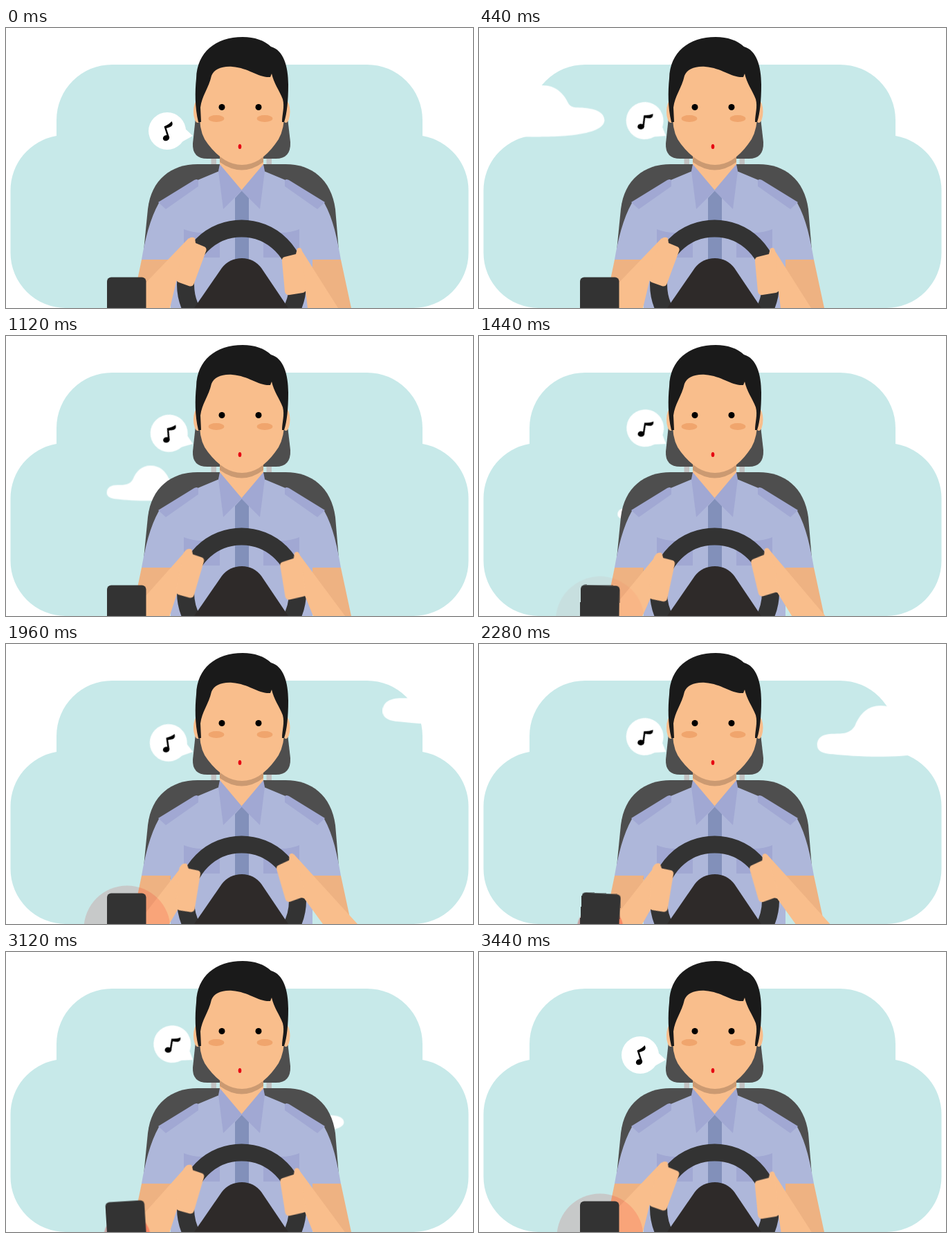
An HTML page without scripts that plays this animation: 675 px wide and 405 px high, repeating every 3.48 s.

```html
<!DOCTYPE html>
<html lang="en">
<head>
<meta charset="utf-8">
<title>Driver with a ringing phone</title>
<style>
  :root { --loop: 3480ms; }
  html, body { margin: 0; width: 100%; height: 100%; overflow: hidden; background: #fff; }
  svg { display: block; width: 100vw; height: 100vh; }

  .sky { fill: #c7e9e9; }
  .seat { fill: #4e4e4e; }
  .post { fill: #c1c1c1; }
  .skin { fill: #f9be8c; }
  .shade { fill: #eeb282; }
  .neck { fill: #cb9a72; }
  .hair { fill: #1a1a1a; }
  .blush { fill: #f0a56d; }
  .shirt { fill: #aeb7da; }
  .trim { fill: #a1a8d3; }
  .placket { fill: #8290ba; }
  .dark { fill: #333; }
  .wheel { fill: none; stroke: #333; stroke-width: 25; }
  .hub { fill: #2e2a29; }
  .white { fill: #fff; }

  .cloud, .bubble, .hands, .forearm, .glow, .phone { animation: var(--loop) linear infinite; }

  .cloud.left { animation-name: drift-left; }
  .cloud.right { animation-name: drift-right; }
  @keyframes drift-left {
    0% { transform: translate(-13px, 45px) scale(1.445); }
    6.3% { transform: translate(43px, 84px) scale(1.315); }
    23% { transform: translate(165px, 179px) scale(.95); }
    41.4% { transform: translate(251px, 247px) scale(.65); }
    50%, 100% { transform: translate(285px, 272px) scale(.48); }
  }
  @keyframes drift-right {
    0%, 50% { transform: translate(706px, 32px) scale(1.48); }
    56.3% { transform: translate(650px, 74px) scale(1.35); }
    73.6% { transform: translate(518px, 172px) scale(1); }
    89.7% { transform: translate(436px, 239px) scale(.67); }
    100% { transform: translate(400px, 272px) scale(.46); }
  }

  .bubble {
    transform-origin: 270px 156.5px;
    animation-name: sway;
    animation-duration: calc(var(--loop) / 2);
  }
  @keyframes sway {
    0%, 97.7%, 100% { transform: rotate(0deg); }
    12.6% { transform: rotate(9.5deg); }
    27% { transform: rotate(27deg); animation-timing-function: ease-in-out; }
    46.5% { transform: rotate(5.5deg); }
    51% { transform: rotate(2deg); animation-timing-function: ease-in-out; }
    79.3% { transform: rotate(26.5deg); }
    81% { transform: rotate(27.5deg); }
    82.8% { transform: rotate(26.5deg); }
    93% { transform: rotate(3deg); }
  }

  .hands { transform-origin: 340.5px 371px; animation-name: steer; }
  @keyframes steer {
    0%, 100% { transform: rotate(0deg); }
    15% { transform: rotate(0deg); animation-timing-function: ease-in-out; }
    56% { transform: rotate(-11deg); }
    62% { transform: rotate(-11deg); animation-timing-function: cubic-bezier(.45, .05, .8, .85); }
  }

  .forearm { d: var(--rest); animation-name: reach; }
  .forearm.left {
    --rest: path("M264 304L190 381L190 405L237 405L247 363L270 335Z");
    --turned: path("M257 318L190 404L190 405L236 405L250 381L270 345Z");
  }
  .forearm.right {
    --rest: path("M425 318L480 405L470 405L436 405L433 381L405 360Z");
    --turned: path("M416 304L508 405L470 405L458 405L431 368L405 360Z");
  }
  @keyframes reach {
    0%, 100% { d: var(--rest); }
    15% { d: var(--rest); animation-timing-function: ease-in-out; }
    56% { d: var(--turned); }
    62% { d: var(--turned); animation-timing-function: cubic-bezier(.45, .05, .8, .85); }
  }

  .glow {
    fill: #ff4d4d;
    mix-blend-mode: multiply;
    transform-origin: 175px 412px;
    animation-name: pulse;
  }
  @keyframes pulse {
    0%, 34% { transform: scale(1.04); opacity: 0; }
    56.3%, 77.6%, 98.9% { transform: scale(1); opacity: .2; animation-timing-function: ease-in-out; }
    67%, 88.2% { transform: scale(.52); opacity: .45; animation-timing-function: ease-in-out; }
    100% { transform: scale(1); opacity: .2; }
  }

  .phone {
    transform-origin: 174px 405px;
    animation-name: buzz;
    animation-timing-function: ease-in-out;
  }
  @keyframes buzz {
    0%, 35.1%, 98.9%, 100% { transform: rotate(0deg); }
    38.6%, 52.8%, 67%, 81.1%, 95.3% { transform: rotate(4.3deg); }
    45.7%, 59.9%, 74%, 88.2% { transform: rotate(-4.3deg); }
  }
</style>
</head>
<body>
<svg viewBox="0 0 675 405" preserveAspectRatio="none">
  <defs>
    <path id="cloud" d="M-78 17C-78 7 -70 3 -58 3C-46 3 -37 3 -31 -7C-25 -22 -15 -32 1 -32C18 -32 28 -22 34 -9C38 -3 46 -5 54 -4C68 -3 78 2 78 11C78 27 38 31.500 -2 31.500C-25 31.500 -45 30 -58 28.500C-70 28 -78 25 -78 17Z"/>
    <g id="half-shirt">
      <path class="trim" d="M257 291Q269 296 283 296H309V332H276L257 322Z"/>
      <path class="trim" d="M220 252L272 220Q278 217 278 222V229L231 262Z"/>
      <path class="trim" d="M309 197L341 235L314 262L307 207Z"/>
    </g>
  </defs>

  <path class="sky" d="M73 156V133A80 80 0 0 1 153 53H522A80 80 0 0 1 602 133V156A80 80 0 0 1 668.500 235V325A80 80 0 0 1 588 405H87A80 80 0 0 1 6.500 325V235A80 80 0 0 1 73 156Z"/>
  <use class="cloud left white" href="#cloud"/>
  <use class="cloud right white" href="#cloud"/>

  <g class="bubble">
    <circle class="white" cx="233" cy="149" r="27"/>
    <path class="white" d="M256 143L270 156L252 166Z"/>
    <ellipse cx="231.500" cy="159.200" rx="4.800" ry="4" transform="rotate(-25 231.500 159.200)"/>
    <path d="M228.500 142.500Q236 139 239.500 135Q242.500 140 238.500 142.500Q235 144 231.800 145L236.200 158.500L233.800 159.500Z"/>
  </g>

  <!-- Seat and ears -->
  <rect class="post" x="296.500" y="187" width="7.500" height="11"/>
  <rect class="post" x="376.500" y="187" width="7.500" height="11"/>
  <path class="seat" d="M199 322L205 262C210 219 239 197 277 197H404C442 197 470 219 476 262L481 322L470 340H210Z"/>
  <path class="seat" d="M274 130H407L411 165Q412 189 390 189H291Q269 189 270 167Z"/>
  <ellipse class="skin" cx="277" cy="121" rx="6" ry="16"/>
  <ellipse class="skin" cx="404.500" cy="121" rx="6" ry="16"/>

  <!-- Shirt -->
  <path class="shirt" d="M308 207L277 220L221 253C208 276 201 306 196 335H238V405H443V335H484C479 306 473 276 460 253L404 220L373 207Z"/>
  <path class="skin" d="M309 180H372V200L341 236L309 200Z"/>
  <path class="neck" d="M309 180H372V194Q341 217 309 194Z"/>
  <path class="placket" d="M331 246L341 235L351 246V345H331Z"/>
  <use href="#half-shirt"/>
  <use href="#half-shirt" transform="matrix(-1 0 0 1 681 0)"/>

  <!-- Face -->
  <path class="skin" d="M280 50H402V132Q400 155 389 168Q367 198 341 198Q315 198 292 168Q281 155 280 132Z"/>
  <path class="hair" d="M278 136C273 115 273 92 275 73C276 35 303 13 342 13C360 13 373 18 383 27C401 32 408 55 408 82C408 105 406 124 402 136H399C399 125 403 114 400 103C395 90 387 80 384 66L382 71C364 72 352 58 327 56C311 55 301 60 297 69C293 87 283 98 281 115L282 136Z"/>
  <circle cx="312" cy="114.500" r="4.500"/>
  <circle cx="365" cy="114.500" r="4.500"/>
  <ellipse class="blush" cx="304" cy="131" rx="11.500" ry="5"/>
  <ellipse class="blush" cx="374" cy="131" rx="11.500" ry="5"/>
  <ellipse cx="338" cy="171.500" rx="2.300" ry="3.500" fill="#e60012"/>

  <!-- Arms and wheel -->
  <path class="shade" d="M196 335H238L236 405H190V364Z"/>
  <path class="shade" d="M443 335H484L499 405H460L443 360Z"/>
  <circle class="wheel" cx="340.500" cy="371" r="81"/>
  <path class="hub" d="M272 405L312 347Q323 333 341 333Q358 333 369 347L408 405Z"/>
  <path class="forearm left skin"/>
  <path class="forearm right skin"/>
  <g class="hands skin">
    <path d="M261 308Q267 300 273 304L274 311L286 316Q291 318 289 323L272 369Q270 375 264 373L250 368Q245 366 246 360Z"/>
    <path d="M403 331L419 327L421 319Q427 316 428 323L433 376Q434 382 429 383L410 386Q404 387 403 381L399 338Q398 332 403 331Z"/>
  </g>

  <circle class="glow" cx="175" cy="412" r="62.500"/>
  <rect class="phone dark" x="146" y="360.500" width="56.500" height="60" rx="6"/>
</svg>
</body>
</html>
```
